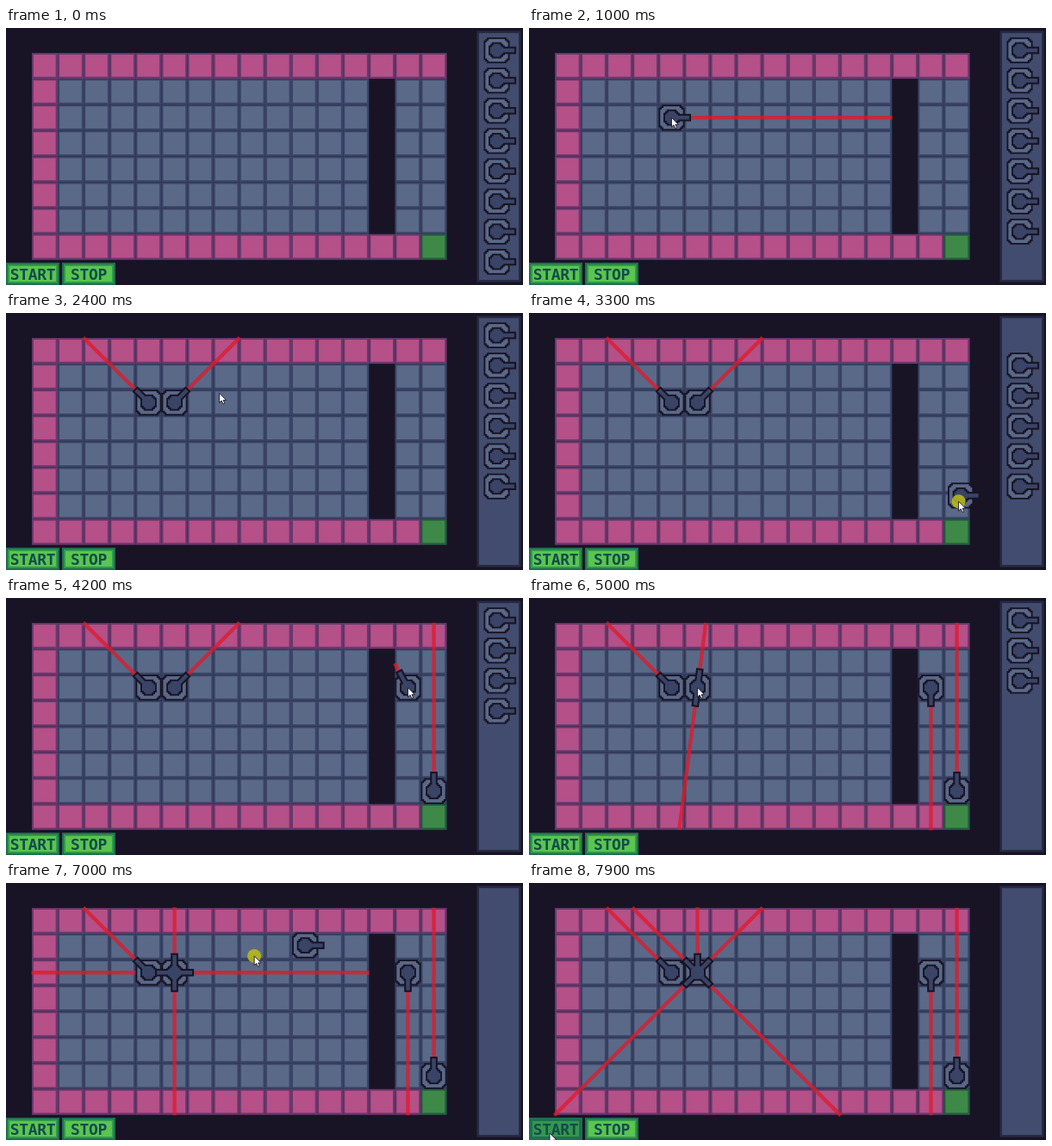
An HTML page with a canvas for the animation above (8000 ms loop, 600 px wide and 299 px high).

```html
<!DOCTYPE html>
<html lang="en">
<head>
<meta charset="utf-8">
<title>Turret puzzle</title>
<style>
  html, body { margin: 0; width: 100%; height: 100%; overflow: hidden; background: #181425; }
  canvas { position: absolute; left: 0; top: 0; }
  .button {
    position: absolute; top: 273px; width: 62px; height: 26px; box-sizing: border-box;
    border: 2px solid #1e6f50; box-shadow: inset 0 0 0 2px #33984b;
    background: #5ac54f; color: #134c4c;
    font: bold 18px/23px "DejaVu Sans Mono", monospace;
    letter-spacing: -.3px; text-align: center; white-space: nowrap;
  }
  .button.hover { background: #33984b; box-shadow: inset 0 0 0 2px #1e6f50; }
  #start { left: 0; }
  #stop { left: 65px; }
</style>
</head>
<body>
<div class="button" id="start">START</div>
<div class="button" id="stop">STOP</div>
<canvas id="stage" width="600" height="299"></canvas>
<script>
const ctx = document.getElementById('stage').getContext('2d');
const startButton = document.getElementById('start');
const LOOP = 8000, CELL = 30.1, PX = CELL / 16, LEFT = 30, TOP = 29;
const COLS = 16, ROWS = 8, RIGHT = LEFT + COLS * CELL, BOTTOM = TOP + ROWS * CELL;
const LAG = 50, PAUSE = 60, TURN = 80;
const DARK = '#181425', SLATE = '#3a4466', STEEL = '#5a6988', PANEL = '#424c6e';
const RAD = Math.PI / 180;

const centerX = col => LEFT + (col + .5) * CELL;
const centerY = row => TOP + (row + .5) * CELL;
const turret = (pick, drop, col, row, turns) =>
  ({ pick, drop, x: centerX(col), y: centerY(row), turns, done: drop + PAUSE + turns * TURN });

// Each turret is dragged to a cell, then that cell is turned by 45 degree steps.
const turrets = [
  turret(400, 980, 4, 2, 3),
  turret(1700, 2230, 5, 2, 1),
  turret(2800, 3400, 15, 6, 2),
  turret(3750, 3930, 14, 2, 6),
  turret(4620, 4874, 5, 2, 1),
  turret(5350, 5700, 5, 2, 0),
  turret(6106, 6541, 5, 2, 0),
  turret(6820, 7180, 5, 2, 1)
];
const cells = turrets
  .filter((a, i) => turrets.findIndex(b => b.x === a.x && b.y === a.y) === i)
  .map(({ x, y }) => ({ x, y, stack: turrets.filter(p => p.x === x && p.y === y) }));
// Directions of guns sharing a cell, relative to the first
const stackOffsets = [0, 180, 90, -90, 45];

// The pointer shuttles between the panel and the cells, ending on START.
const path = [
  [100, 24, 312],
  ...turrets.flatMap(p => [[p.pick, 570, 26], [p.drop, p.x, p.y], [p.done, p.x, p.y]]),
  [7800, 24, 291]
];

function pointer(t) {
  const next = path.findIndex(p => p[0] > t);
  if (next === 0) return path[0].slice(1);
  if (next < 0) return path[path.length - 1].slice(1);
  const [t0, x0, y0] = path[next - 1], [t1, x1, y1] = path[next];
  const k = 1 - (1 - (t - t0) / (t1 - t0)) ** 2;
  return [x0 + (x1 - x0) * k, y0 + (y1 - y0) * k];
}

function rect(color, x, y, w, h) {
  ctx.fillStyle = color;
  ctx.fillRect(x, y, w, h);
}

const isHole = (col, row) => col === 13 && row > 0 && row < 7;

function tileColors(col, row) {
  if (col === 15 && row === 7) return ['#265c42', '#3e8948'];
  if (col === 0 || row === 0 || row === 7) return ['#68386c', '#b55088'];
  return [SLATE, STEEL];
}

function drawBoard() {
  for (let row = 0; row < ROWS; row++) {
    for (let col = 0; col < COLS; col++) {
      if (isHole(col, row)) continue;
      const [edge, face] = tileColors(col, row);
      const x = LEFT + col * CELL, y = TOP + row * CELL;
      rect(edge, x, y, CELL, CELL);
      rect(face, x + 2, y + 2, CELL - 4.4, CELL - 4.4);
    }
  }
}

function drawPanel() {
  rect('#262b44', 546.5, 3.5, 51, 292);
  rect(PANEL, 549, 6, 46, 287);
}

// Pixel square with stepped corners
function block(color, r) {
  for (let i = 0; i < 3; i++) {
    const w = r - i, h = r - 2 + i;
    rect(color, -w, -h, 2 * w, 2 * h);
  }
}

function barrels(color, angles, length, half) {
  for (const a of angles) {
    ctx.save();
    ctx.rotate(a * RAD);
    rect(color, 0, -half, length, 2 * half);
    ctx.restore();
  }
}

function drawTurret(x, y, angles) {
  ctx.save();
  ctx.translate(x, y);
  ctx.scale(PX, PX);
  block(DARK, 8);
  block(STEEL, 7);
  block(DARK, 5);
  barrels(DARK, angles, 12, 2.3);
  block(SLATE, 4);
  barrels(SLATE, angles, 10.9, 1.2);
  ctx.restore();
}

function drawLaser(x, y, angle) {
  const dx = Math.cos(angle * RAD), dy = Math.sin(angle * RAD);
  let d = 22, ex, ey;
  do {
    d++;
    ex = x + dx * d;
    ey = y + dy * d;
  } while (ex > LEFT && ex < RIGHT && ey > TOP && ey < BOTTOM &&
    !isHole(Math.floor((ex - LEFT) / CELL), Math.floor((ey - TOP) / CELL)));
  ctx.strokeStyle = 'rgba(226,24,40,.75)';
  ctx.lineWidth = 4.4;
  ctx.beginPath();
  ctx.moveTo(x + dx * 22, y + dy * 22);
  ctx.lineTo(ex, ey);
  ctx.stroke();
}

function gunAngles(stack, t) {
  const placed = stack.filter(p => t >= p.drop);
  const turned = placed.reduce((sum, p) =>
    sum + Math.max(0, Math.min(p.turns, (t - p.drop - PAUSE) / TURN)), 0);
  return placed.map((p, i) => stackOffsets[i] - 45 * turned);
}

function drawPointer(x, y, pressed) {
  if (pressed) {
    ctx.fillStyle = 'rgba(190,190,20,.85)';
    ctx.beginPath();
    ctx.arc(x, y, 8, 0, 7);
    ctx.fill();
  }
  ctx.save();
  ctx.translate(x, y);
  ctx.fillStyle = '#fff';
  ctx.strokeStyle = DARK;
  ctx.lineWidth = .9;
  const arrow = new Path2D('M0 0V11L2.5 8.6 4.4 12.4 6.2 11.6 4.5 8H8Z');
  ctx.fill(arrow);
  ctx.stroke(arrow);
  ctx.restore();
}

function draw(t) {
  ctx.clearRect(0, 0, 600, 299);
  drawBoard();
  drawPanel();

  const placed = turrets.filter(p => t >= p.drop).length;
  const held = turrets.find(p => t >= p.pick && t < p.drop);
  for (let slot = held ? 1 : 0; slot < turrets.length - placed; slot++) {
    drawTurret(569.5, 26 + slot * 35.15, [0]);
  }

  const groups = cells.map(c => [c.x, c.y, gunAngles(c.stack, t)]);
  for (const [x, y, angles] of groups) angles.forEach(a => drawLaser(x, y, a));
  for (const [x, y, angles] of groups) if (angles.length) drawTurret(x, y, angles);

  if (held) drawTurret(...pointer(Math.max(held.pick, t - LAG)), [0]);

  const [x, y] = pointer(t);
  startButton.classList.toggle('hover', x < 62 && y > 273 && y < 299);
  drawPointer(x, y, held);
}

const begin = performance.now();
function tick() {
  draw((performance.now() - begin) % LOOP);
  requestAnimationFrame(tick);
}
tick();
</script>
</body>
</html>
```
